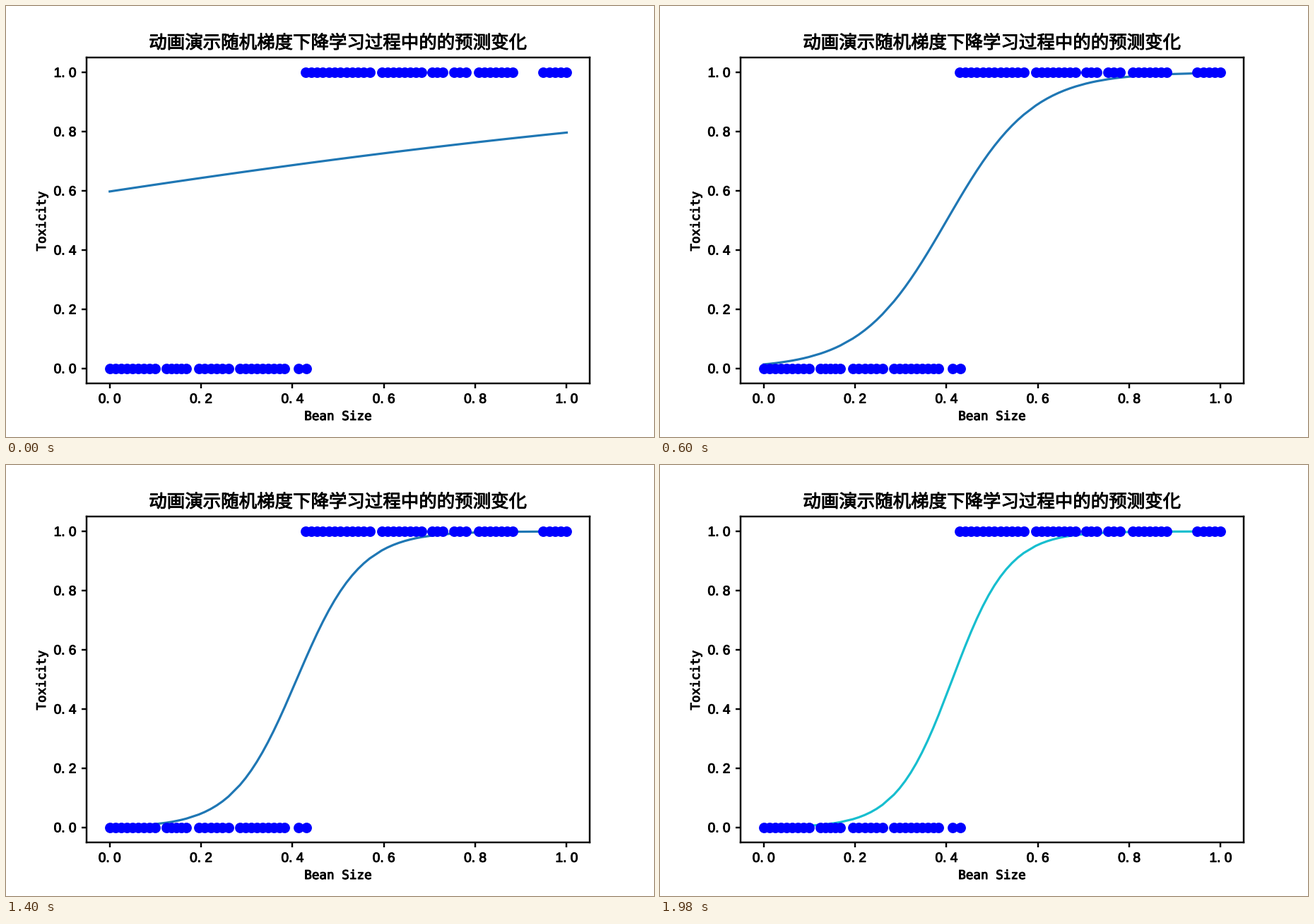
A matplotlib script that plays this animation: 917 px wide and 611 px high, repeating every 2000 ms.

```python
import numpy as np
import matplotlib.pyplot as plt
from matplotlib.animation import FuncAnimation
from matplotlib.patheffects import withStroke

W, H, DPI = 917, 611, 152.8
FRAMES = 100
GAP = 0.0125  # usual distance between neighbouring beans
INK = [withStroke(linewidth=0.45, foreground="black")]

plt.rcParams.update({
    "axes.linewidth": 1.15,
    "xtick.major.width": 1.15,
    "ytick.major.width": 1.15,
})

# First and last bean of each unbroken run
SAFE = [(0, 0.099), (0.124, 0.168), (0.195, 0.26), (0.285, 0.383),
        (0.413, 0.43)]
TOXIC = [(0.428, 0.569), (0.595, 0.683), (0.705, 0.728), (0.753, 0.779),
         (0.807, 0.882), (0.949, 1)]


def beans(runs):
    return np.concatenate([np.linspace(a, b, round((b - a) / GAP) + 1)
                           for a, b in runs])


def learn(n, start, scale, power):
    """Leave the start value quickly, then follow a slow power law."""
    return start + (scale * n ** power - start) * (1 - np.exp(-n / 1.8))


safe, toxic = beans(SAFE), beans(TOXIC)
xs = np.concatenate([safe, toxic])
xs.sort()

fig = plt.figure(figsize=(W / DPI, H / DPI), dpi=DPI, facecolor="white")
ax = fig.add_axes([114.4 / W, 1 - 534.9 / H, 711.4 / W, 461.7 / H])
ax.set_xlim(-0.05, 1.05)
ax.set_ylim(-0.05, 1.05)

ticks = np.arange(6) / 5
names = [f"{t:.1f}".replace(".", ". ") for t in ticks]
style = dict(family="Liberation Sans", size=9, path_effects=INK)
ax.set_xticks(ticks, names, **style)
ax.set_yticks(ticks, names, **style)


def write(x, y, text, family, size, angle=0):
    fig.text(x / W, 1 - y / H, text, family=family, size=size, rotation=angle,
             ha="center", va="center", path_effects=INK)


write(470, 582, "Bean Size", "DejaVu Sans Mono", 8.3)
write(51, 305, "Toxicity", "DejaVu Sans Mono", 8.3, 90)
write(470, 53, "动画演示随机梯度下降学习过程中的的预测变化",
      "Noto Sans CJK JP", 12)

for group, level in ((safe, 0), (toxic, 1)):
    ax.plot(group, np.full(len(group), level), "bo", ms=6, zorder=3)
curve, = ax.plot([], [], lw=1.5, zorder=2)


def update(i):
    w = learn(i, 0.97, 3.157, 0.357)
    b = learn(i, 0.397, -1.159, 0.3825)
    curve.set_data(xs, 1 / (1 + np.exp(-(w * xs + b))))
    curve.set_color(f"C{i % 10}")
    return curve,


anim = FuncAnimation(fig, update, frames=FRAMES, interval=20,
                     repeat=True, repeat_delay=0)
plt.show()
```
